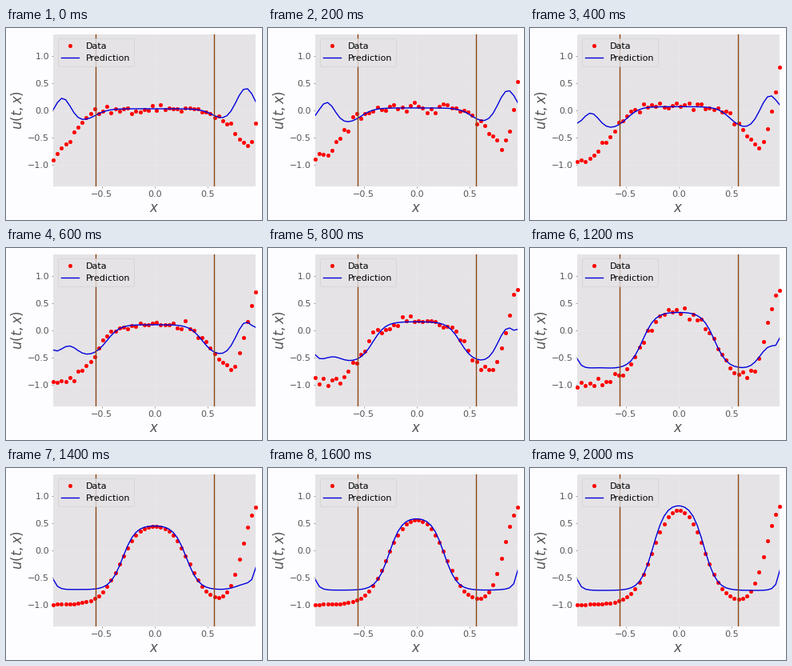
A matplotlib script that plays this animation: 320 px wide and 240 px high, repeating every 2100 ms.

```python
import numpy as np
import matplotlib.pyplot as plt
from matplotlib.animation import FuncAnimation

W, H, DPI = 320, 240, 50
FRAMES, INTERVAL = 21, 100
X_MAX = 0.958
NOISY_UNTIL, NOISE = 12, 0.042
PANEL = "#e5e3e6"

plt.rcParams.update({
    "font.family": "DejaVu Sans",
    "font.size": 16,
    "axes.labelcolor": "#555555",
    "xtick.color": "#555555",
    "ytick.color": "#555555",
})

x = np.linspace(-X_MAX, X_MAX, 50)


def logistic(z):
    return 1 / (1 + np.exp(-z))


def fade(n, span):
    return np.exp(-(n / span)**2)


def bump(center, width):
    return np.exp(-((x - center) / width)**2 / 2)


def plateau(a, w):
    """Two facing kinks at -a and a, scaled to 1 in the middle."""
    return (np.tanh((x + a) / w) - np.tanh((x - a) / w)) / (2 * np.tanh(a / w))


def half_width(n, values):
    """Narrows steadily, then settles."""
    return np.interp(n, [0, 12, 16, 20], values)


def measured(n):
    peak = 0.9 * logistic(0.25 * (n - 14.1))
    a = half_width(n, [0.78, 0.37, 0.28, 0.242])
    u = -1 + (1 + peak) * plateau(a, 0.19)

    # Front moving in from the right boundary
    early = np.exp(-n / 5)
    u += 1 + np.tanh((x - 0.815 - 0.16 * early) / (0.13 - 0.085 * early))

    if n <= NOISY_UNTIL:
        u += np.random.default_rng(100 + n).normal(0, NOISE, x.size)
    return u


def predicted(n):
    floor = -0.74 + 0.52 * fade(n, 7.2)
    peak = 1.1 * logistic(0.24 * (n - 15.6))
    a = half_width(n, [0.56, 0.34, 0.26, 0.24])
    u = floor + (peak - floor) * plateau(a, 0.12)

    # Side lobes that die out
    u += 0.44 * fade(n, 6.5) * bump(-0.87 + 0.01 * n, 0.077)
    u += 0.62 * logistic((12.5 - n) / 0.9) * bump(0.865, 0.092)

    # Upturn at both boundaries
    upturn = 0.2 * np.exp(-(x + X_MAX) / 0.036)
    upturn += 0.37 * np.exp((x - X_MAX) / 0.032)
    return u + (1 - fade(n, 8)) * upturn


fig = plt.figure(figsize=(W / DPI, H / DPI), dpi=DPI, facecolor="#fdfcff")
ax = fig.add_axes([59.1 / W, 42.1 / H, 253.2 / W, 190.4 / H], facecolor=PANEL)
ax.set(xlim=(-X_MAX, X_MAX), ylim=(-1.4, 1.4),
       xticks=[-0.5, 0, 0.5], yticks=[-1, -0.5, 0, 0.5, 1])
ax.set_xlabel("$x$", fontsize=24)
ax.set_ylabel("$u(t,x)$", fontsize=24)
ax.set_axisbelow(True)
ax.grid(color="white", lw=0.8, alpha=0.25)
ax.spines[:].set_visible(False)

dots, = ax.plot(x, measured(0), "o", color="red", ms=6.3, clip_on=False,
                label="Data")
line, = ax.plot(x, predicted(0), color="#0000dd", lw=2, label="Prediction")
for edge in (-0.56, 0.56):
    ax.axvline(edge, color="saddlebrown", lw=2)
ax.legend(loc="upper left", facecolor=PANEL, edgecolor="0.8")


def draw(n):
    dots.set_ydata(measured(n))
    line.set_ydata(predicted(n))
    return dots, line


anim = FuncAnimation(fig, draw, frames=FRAMES, interval=INTERVAL, repeat=True)
plt.show()
```
